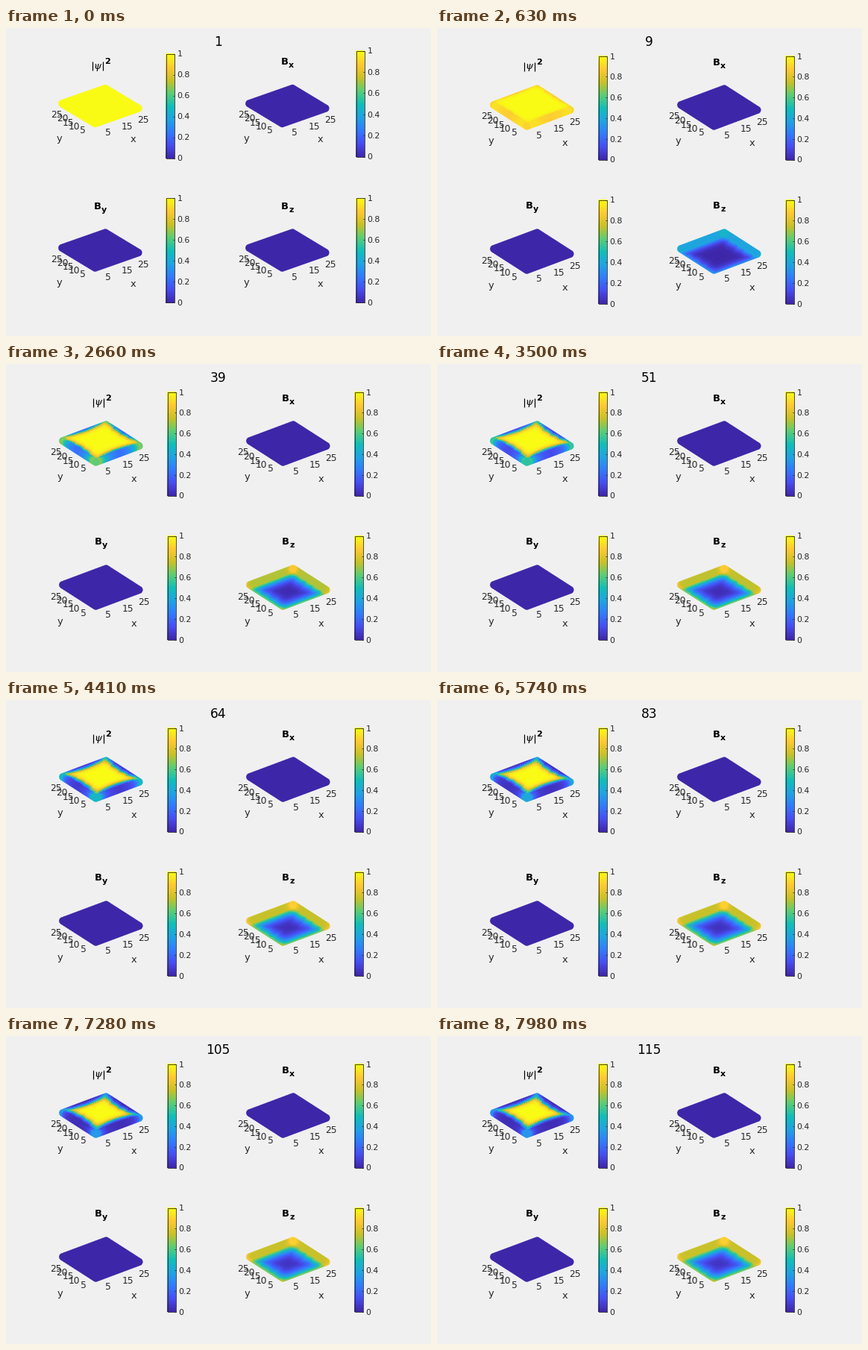
Animation of 570x413 px, one loop 8000 ms. Source, as a matplotlib script:

```python
import numpy as np
import matplotlib.pyplot as plt
from matplotlib.animation import FuncAnimation
from matplotlib.colors import LinearSegmentedColormap
from matplotlib.patches import Rectangle

W, H, DPI = 570, 413, 64
LOOP, STEP, TICK = 8000, 70, 40
PT = 72 / DPI
BG = (240 / 255,) * 3
INK = (0.15, 0.15, 0.15)
N = 25            # points along each side of a slab
R = 5.2           # disc radius
PITCH = 251       # distance between panel columns

PARULA = LinearSegmentedColormap.from_list("parula", [
    "#3e26a8", "#484cef", "#337afd", "#21a3e3", "#12beb9",
    "#5ccd76", "#c8c129", "#fec934", "#f9fb15"])

gx, gy = (g.ravel() for g in np.meshgrid(np.arange(N), np.arange(N)))


def shade(v):
    return PARULA(v)[..., :3]


def density(n):
    """Eaten away along the edges, less so in the corners."""
    k = np.exp(4.5 - 7.64 * np.exp(-n / 40)) * (1 - np.exp(-(n - 1) / 4))
    floor = min(1, .13 / np.sqrt(k + 1e-6))
    u = np.minimum(gx, N - 1 - gx)
    v = np.minimum(gy, N - 1 - gy)

    def decay(a):
        return np.exp(-1.17 * a)

    def along(a):
        return floor + (1 - floor) * (1 - np.exp(-a / 7)) ** 2

    return 1 / (1 + k * (decay(u) * along(v) + decay(v) * along(u)))


def field(n):
    """Soaks in from all four sides, a little more from the far ones."""
    edge = .75 * (1 - np.exp(-(n - 1) / 11))
    reach = 4.8 - 2.4 * np.exp(-(n - 1) / 40)

    def soak(a):
        return sum(np.exp(-(d / reach) ** 1.3) for d in (a + 1, N - 1 - a))

    return edge * (soak(gx) ** 4 + soak(gy) ** 4) ** .25


def cover(cx, cy, rise, far_on_top):
    """Which disc shows at each pixel, and how much of the pixel is covered."""
    px = cx - .5 + 2.41 * gx - 1.84 * gy
    py = cy - .5 - rise * (.90 * gx + 1.18 * gy)
    owner = np.zeros((H, W), int)
    alpha = np.zeros((H, W))
    order = np.argsort(py, kind="stable")
    for i in order[::-1] if far_on_top else order:
        x0, y0 = int(px[i]) - 6, int(py[i]) - 6
        yy, xx = np.mgrid[y0:y0 + 14, x0:x0 + 14]
        disc = np.clip(R + .5 - np.hypot(xx - px[i], yy - py[i]), 0, 1)
        box = np.s_[y0:y0 + 14, x0:x0 + 14]
        owner[box][(disc > .5) | (disc > alpha[box])] = i
        alpha[box] = np.maximum(alpha[box], disc)
    on = alpha > 0
    return on, owner[on], alpha[on][:, None]


fig = plt.figure(figsize=(W / DPI, H / DPI), dpi=DPI, facecolor=BG)
picture = fig.figimage(np.ones((H, W, 3)) * BG, origin="upper", zorder=0)
ax = fig.add_axes([0, 0, 1, 1], zorder=2)
ax.set(xlim=(0, W), ylim=(H, 0))
ax.axis("off")


def write(x, y, s, px, ha="left", color=INK, family="DejaVu Sans", **kw):
    return ax.text(x, y, s, fontsize=px * PT, ha=ha, va="baseline",
                   color=color, family=family, **kw)


def stroke(xs, ys, width, color=INK):
    return ax.plot(xs, ys, color=color, lw=width * PT, solid_capstyle="butt")[0]


def heading(x, y, sub):
    if sub:
        return [write(x, y + 4.6, "B", 13, color="k", weight="bold"),
                write(x + 10.3, y + 9.2, sub, 11, color="k", weight="bold")]
    y += 6
    bars = [stroke([x + d, x + d], [y - 5.5, y + 7], 1.2, "k") for d in (-2.5, 12)]
    return bars + [
        write(x + 4.7, y + 4.5, "\u03c8", 13, "center", "k", "DejaVu Serif",
              style="italic"),
        write(x + 14.2, y - 2, "2", 11.3, color="k", weight="bold")]


def axis_labels(cx, cy, rise):
    parts = [write(cx + 51, cy + 27 * rise, "x", 13, "center"),
             write(cx - 48, cy + 24, "y", 13, "center")]
    for j in range(3):
        parts.append(write(cx + 13 + 22 * j, cy + 16 - 8.8 * rise * j,
                           str(5 + 10 * j), 12.2))
    for j in range(5):
        parts.append(write(cx - 12.5 - 8.4 * rise * j, cy + 13 - 5.5 * rise * j,
                           str(5 + 5 * j), 12.2, "right"))
    return parts


def color_bar(img, x, top, bottom):
    rows = np.arange(int(top), int(bottom) + 1)
    img[rows, int(x):int(x) + 12] = shade((bottom - rows) / (bottom - top))[:, None]
    parts = [ax.add_patch(Rectangle((x, top), 11, bottom - top, fill=False,
                                    ec=INK, lw=.8 * PT))]
    for j in range(6):
        y = bottom + (top - bottom) * j / 5
        parts.append(write(x + 14.8, y + 4, f"{j / 5:g}", 11))
        parts.append(stroke([x + 9.5, x + 11], [y, y], .8))
    return parts


def build(first):
    """All fixed parts; the first step sits slightly higher and flatter."""
    rise = 1 - .06 * first
    img = np.ones((H, W, 3)) * BG
    parts, slabs = [], []
    for i, sub in enumerate(["", "x", "y", "z"]):
        row, col = divmod(i, 2)
        dx, dy = PITCH * col, (193 + .5 * first) * row
        cx, cy = 120.5 - first + dx, 131.5 - 3.5 * first + dy
        lift = first * col * (1 - row)
        parts += axis_labels(cx, cy, rise)
        parts += heading(119 - first + dx, 45 - first + (192 + 2 * first) * row, sub)
        parts += color_bar(img, 216.5 + dx + first * (4 * col - 2),
                           37.5 - 3 * first + dy - 4 * lift,
                           176.5 - 2 * first + dy - 2 * lift)
        slabs.append(cover(cx, cy, rise, sub == "z"))
    return parts, img, slabs


scenes = [build(1), build(0)]
counter = write(284.5, 23.5, "1", 17, "center", "k")
zero = np.zeros(N * N)


def draw(i):
    n = int((i + .5) * TICK) // STEP + 1
    current = min(n - 1, 1)
    for k, (parts, _, _) in enumerate(scenes):
        for part in parts:
            part.set_visible(k == current)
    _, base, slabs = scenes[current]
    img = base.copy()
    for values, (on, owner, alpha) in zip((density(n), zero, zero, field(n)), slabs):
        img[on] = img[on] * (1 - alpha) + shade(values)[owner] * alpha
    picture.set_data(img)
    counter.set_text(str(n))
    return []


anim = FuncAnimation(fig, draw, frames=LOOP // TICK, interval=TICK,
                     init_func=lambda: draw(0), repeat=True, repeat_delay=0)
plt.show()
```
